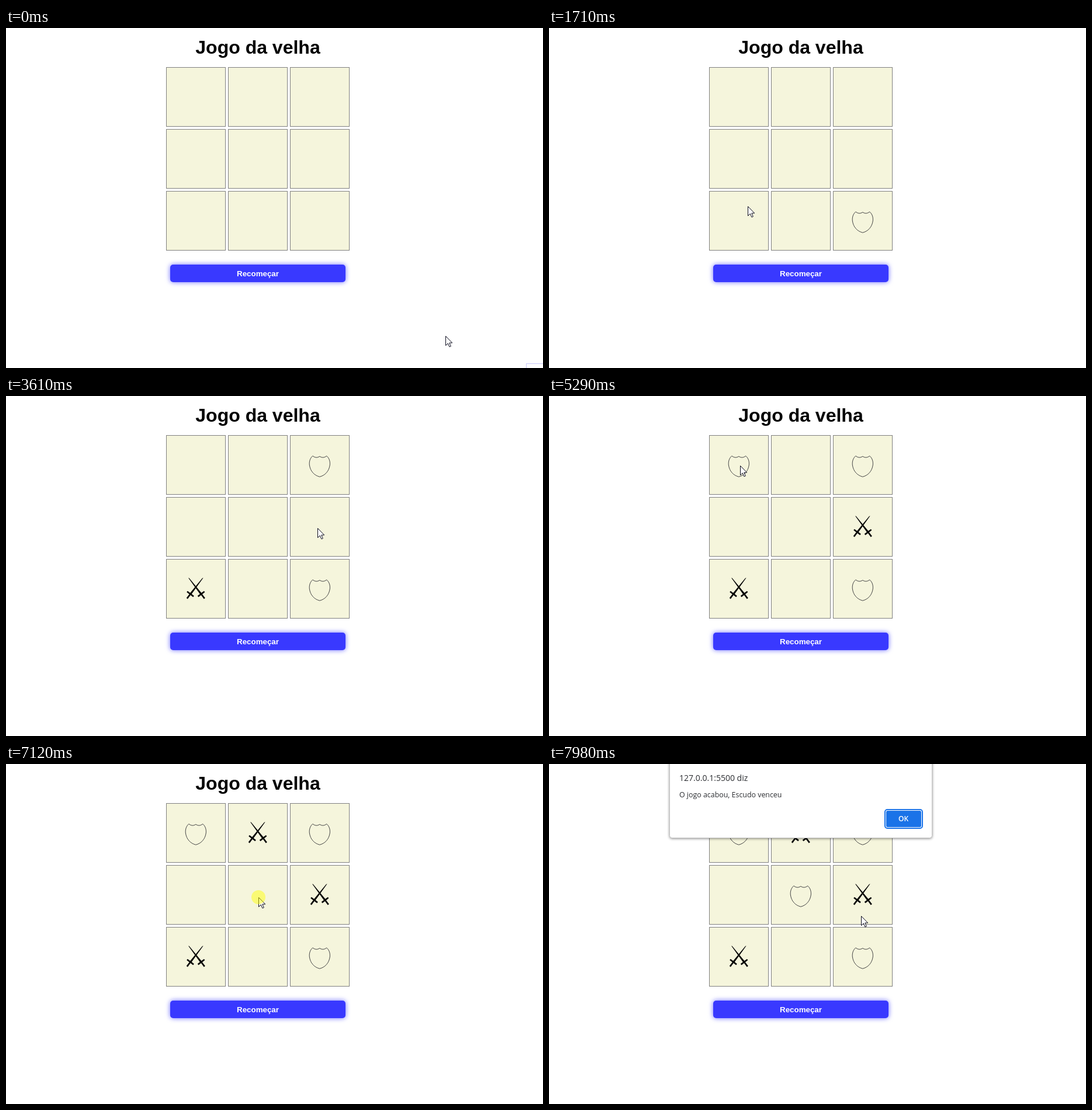
Write an HTML page that moves like this. It is 919 px wide and 582 px high and loops after 8 s.

```html
<!DOCTYPE html>
<html lang="pt">
<head>
<meta charset="utf-8">
<title>Jogo da velha</title>
<style>
  html, body { margin: 0; width: 100%; height: 100%; overflow: hidden; background: #fff; }
  svg { display: block; }
  .page { font-family: "Liberation Sans", Arial, sans-serif; font-weight: bold; text-anchor: middle; }
  .dialog { font-family: "Open Sans", "Noto Sans", sans-serif; fill: #2b2d31; }
  .glow { filter: drop-shadow(0 0 4px rgba(57, 57, 255, .75)); }
  .lift { filter: drop-shadow(0 1px 2px rgba(0, 0, 0, .45)); }
</style>
</head>
<body>
<svg width="919" height="582" viewBox="0 0 919 582">
  <defs>
    <path id="shield" fill="none" stroke="#444" stroke-linejoin="round"
      d="M-12-15.4Q-6-10.5 0-14.6Q6-10.5 12-15.4C17-11 18-5 17.5 0C16 11 9 18 0 20.3C-9 18-16 11-17.5 0C-18-5-17-11-12-15.4Z"/>
    <g id="sword">
      <path d="M12.8-18.7L11.2-18.3-10.6 8.2-8 10.2Z"/>
      <path d="M-14.8 4.7L-3.8 13.1M-9.3 9L-15 16.6" fill="none" stroke="#000" stroke-width="2.6"/>
    </g>
    <g id="swords"><use href="#sword"/><use href="#sword" transform="scale(-1 1)"/></g>
  </defs>

  <g class="page">
    <text x="431" y="44" font-size="32">Jogo da velha</text>
    <g id="board" fill="#f5f5dc" stroke="#808080"></g>
    <rect class="glow" x="281" y="405" width="300" height="30" rx="5" fill="#3939ff"/>
    <text x="431" y="425" font-size="13.333" fill="#fff">Recomeçar</text>
  </g>
  <g id="pieces"></g>
  <rect id="corner" x="890.5" y="574.5" width="60" height="40" fill="#fff" stroke="#c9c9fa"/>

  <g id="dialog" class="dialog">
    <rect class="lift" x="206.5" y="-60" width="449" height="186.5" rx="4" fill="#fff" stroke="#c4c4c4"/>
    <text x="223" y="29" font-size="14">127.0.0.1:5500 diz</text>
    <text x="223" y="57" font-size="12.4">O jogo acabou, Escudo venceu</text>
    <rect x="575" y="78" width="64" height="32" rx="4" fill="#fff" stroke="#1a73e8" stroke-width="2"/>
    <rect x="577" y="80" width="60" height="28" rx="2.5" fill="#1a73e8"/>
    <text x="606.5" y="98" font-size="12" font-weight="600" fill="#fff" text-anchor="middle">OK</text>
  </g>

  <g id="cursor">
    <path d="M.5.5V16.5L4.3 12.9 6.9 18.8 9.3 17.8 6.8 12H11.7Z" fill="#fff" stroke="#0a0a1c"/>
    <circle id="click" r="12" fill="#ff0" fill-opacity=".47"/>
  </g>
</svg>
<script>
const LOOP = 8000, TICK = 70, PITCH = 106;
const byId = id => document.getElementById(id);
const show = (node, visible) => node.setAttribute("visibility", visible ? "visible" : "hidden");

function add(parent, tag, attrs) {
  const node = document.createElementNS("http://www.w3.org/2000/svg", tag);
  for (const name in attrs) node.setAttribute(name, attrs[name]);
  return parent.appendChild(node);
}

const cellCentre = cell => [325 + PITCH * (cell % 3), 118 + PITCH * Math.floor(cell / 3)];

for (let cell = 0; cell < 9; cell++) {
  const [x, y] = cellCentre(cell);
  add(byId("board"), "rect", { x: x - 50.5, y: y - 50.5, width: 101, height: 101 });
}

// Players alternate; each piece appears when the mouse button is released
const turns = [
  { cell: 8, press: 1030 },
  { cell: 6, press: 1980 },
  { cell: 2, press: 2890 },
  { cell: 5, press: 3780 },
  { cell: 0, press: 4680 },
  { cell: 1, press: 6430 },
  { cell: 4, press: 7090 }
].map(({ cell, press }, i) => {
  const [x, y] = cellCentre(cell);
  const href = i % 2 ? "#swords" : "#shield";
  return { press, release: press + TICK, node: add(byId("pieces"), "use", { href, x: x - .2, y }) };
});

// Cursor stops: departure and arrival times, position
const stops = [
  [0, 0, 752, 527],
  [70, 760, 545, 335],
  [1170, 1710, 340, 305],
  [2310, 2860, 530, 138],
  [3260, 3610, 533, 226],
  [3850, 4450, 322, 115],
  [5050, 5290, 327, 119],
  [5600, 5750, 368, 129],
  [5900, 6360, 417, 153],
  [6590, 6950, 432, 228],
  [7440, 7690, 458, 393],
  [7760, 7980, 534, 260]
];

// Share of a movement done at time t, advancing once per tick
function progress(t, from, to) {
  if (t < from) return 0;
  if (t >= to) return 1;
  const gaps = Math.round((to - from) / TICK);
  return (1 + Math.floor((t - from) / (to - from) * gaps)) / (gaps + 1);
}

function cursorAt(t) {
  let x = 0, y = 0;
  for (const [from, to, stopX, stopY] of stops) {
    const p = progress(t, from, to);
    const eased = p * p * (3 - 2 * p);
    x += (stopX - x) * eased;
    y += (stopY - y) * eased;
  }
  return [Math.round(x), Math.round(y)];
}

function draw() {
  const t = performance.now() % LOOP;
  show(byId("corner"), t < TICK);
  for (const { node, release } of turns) show(node, t >= release);
  show(byId("click"), turns.some(({ press, release }) => t >= press && t < release));
  byId("cursor").setAttribute("transform", `translate(${cursorAt(t)})`);

  const hidden = (1 - progress(t, 7230, 7440)) ** 2;
  byId("dialog").setAttribute("transform", `translate(0 ${-48 * hidden})`);
  byId("dialog").setAttribute("opacity", 1 - hidden);
  requestAnimationFrame(draw);
}
draw();
</script>
</body>
</html>
```
